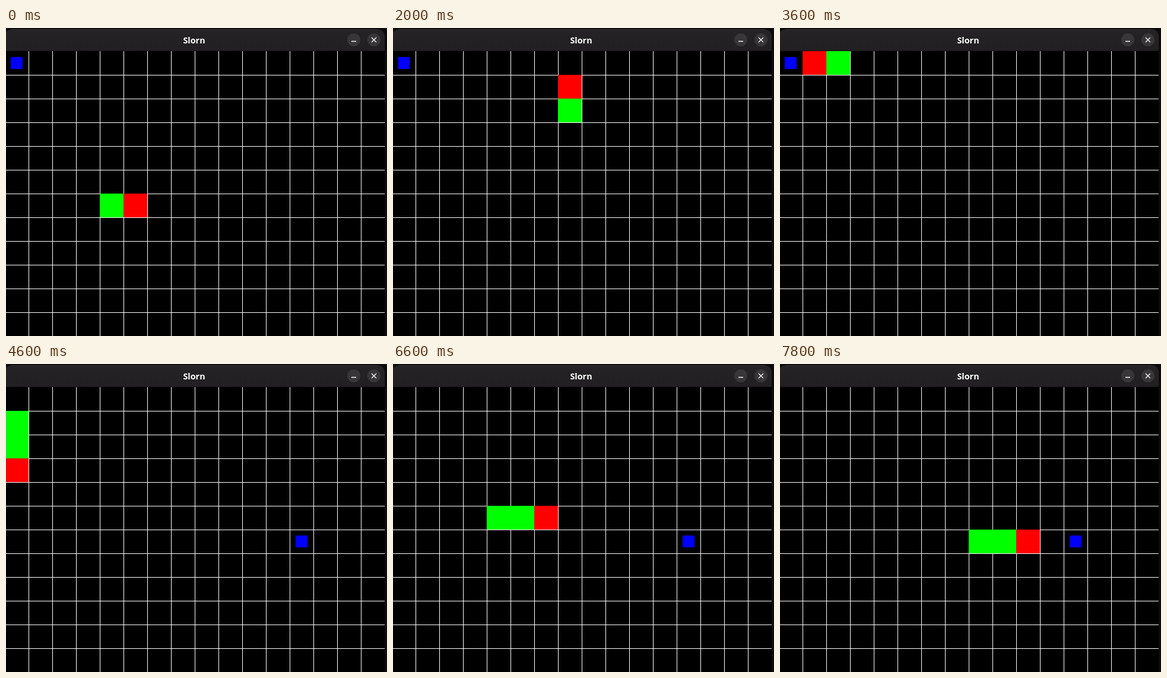
An HTML page for the animation above (8000 ms loop, 642 by 519 pixels).

```html
<!DOCTYPE html>
<html lang="en">
<head>
<meta charset="utf-8">
<title>Slorn</title>
<style>
  html, body { margin: 0; width: 100%; height: 100%; overflow: hidden; background: #0c0c0d; }
  svg { display: block; }
  .title { font: 700 14.4px "Open Sans", "Noto Sans", sans-serif; fill: #fff; text-anchor: middle; }
  .glyph { stroke: #f4f4f4; stroke-width: 1.4; fill: none; }
</style>
</head>
<body>
<svg width="642" height="519" viewBox="0 0 642 519">
  <defs>
    <linearGradient id="bar" x1="0" y1="0" x2="0" y2="1">
      <stop offset="0" stop-color="#252325"/>
      <stop offset="1" stop-color="#211f21"/>
    </linearGradient>
  </defs>
  <rect width="642" height="519" fill="#0c0c0d"/>
  <path d="M-2 39V14a12 12 0 0 1 12-12H626a12 12 0 0 1 12 12V39z" fill="url(#bar)"/>
  <path d="M10 2.5H626" stroke="#343234"/>
  <rect y="38" width="638" height="1" fill="#171617"/>
  <text class="title" x="317" y="26">Slorn</text>
  <g fill="#383638">
    <circle cx="586" cy="20" r="11"/>
    <circle cx="620" cy="20" r="11"/>
  </g>
  <path class="glyph" d="M582 22.5h8M616 16l8 8m0-8l-8 8"/>
  <rect y="39" width="638" height="480" fill="#000"/>
  <path id="grid" stroke="#fff" shape-rendering="crispEdges"/>
  <g id="board" shape-rendering="crispEdges"></g>
</svg>
<script>
const LOOP = 8000, TICK = 200, CELL = 40, LEFT = -2, TOP = 39;
const PAUSES = [600, 1800, 3000, 4200, 5400, 6400, 7600];
const RUNS = [['R', 2], ['U', 6], ['L', 7], ['D', 5], ['R', 7], ['D', 1], ['R', 3]];
const DIRS = { R: [1, 0], L: [-1, 0], U: [0, -1], D: [0, 1] };
const MEAL = 3800;
const FOOD = [[0, 0], [12, 6]];

// Cells visited by the head; the first one is the starting tail.
const path = [[4, 6], [5, 6]];
for (const [dir, count] of RUNS) {
  for (let i = 0; i < count; i++) {
    const [x, y] = path[path.length - 1];
    path.push([x + DIRS[dir][0], y + DIRS[dir][1]]);
  }
}

const moves = [];
for (let t = 400; t < LOOP; t += TICK) {
  if (!PAUSES.includes(t)) moves.push(t);
}

let lines = '';
for (let x = 38.5; x < 638; x += CELL) lines += `M${x} 39V519`;
for (let y = 79.5; y < 519; y += CELL) lines += `M0 ${y}H638`;
document.getElementById('grid').setAttribute('d', lines);

const board = document.getElementById('board');
function addSquare(size, color) {
  const r = document.createElementNS('http://www.w3.org/2000/svg', 'rect');
  r.setAttribute('width', size);
  r.setAttribute('height', size);
  r.setAttribute('fill', color);
  return board.appendChild(r);
}
function place(square, [x, y], inset = 0) {
  square.setAttribute('x', LEFT + x * CELL + inset);
  square.setAttribute('y', TOP + y * CELL + inset);
}

const food = addSquare(20, '#00f');
const body = [addSquare(CELL, '#0f0'), addSquare(CELL, '#0f0')];
const head = addSquare(CELL, '#f00');

function draw(now) {
  const t = now % LOOP;
  const at = 1 + moves.filter(m => m <= t).length;
  const fed = t >= MEAL;
  place(head, path[at]);
  place(body[0], path[at - 1]);
  place(body[1], path[at - (fed ? 2 : 1)]);
  place(food, FOOD[fed ? 1 : 0], 10);
}

const start = performance.now();
function frame() {
  draw(performance.now() - start);
  requestAnimationFrame(frame);
}
frame();
</script>
</body>
</html>
```
